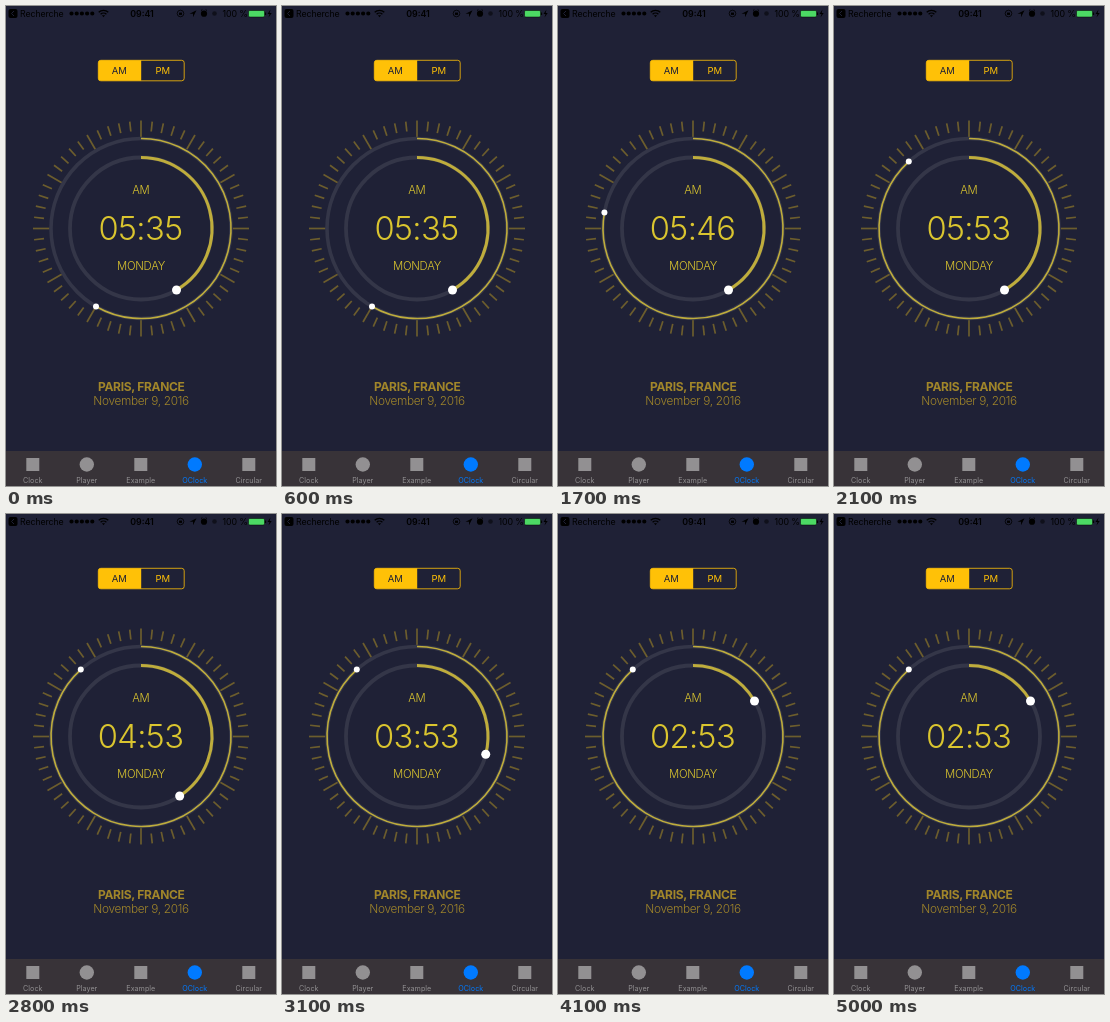
Animation of 270x480 px, one loop 5.1 s. Source, as an HTML page:

```html
<!DOCTYPE html>
<html lang="en">
<head>
<meta charset="utf-8">
<title>Clock slider</title>
<style>
html, body { margin: 0; width: 100%; height: 100%; overflow: hidden; background: #1f2136; }
svg { display: block; width: 100%; height: 100%; font-family: Inter, Roboto, sans-serif; }
.mid { text-anchor: middle; }
.dial { fill: #dac52f; font-size: 11.3px; font-weight: 300; letter-spacing: -.25px; }
.time { fill: #dac52f; font-size: 32.7px; font-weight: 300; letter-spacing: -.6px; }
.place { fill: #a1862a; font-size: 12px; font-weight: 700; letter-spacing: -.3px; }
.date { fill: #a1862a; font-size: 11.8px; font-weight: 300; letter-spacing: -.3px; }
.track { fill: none; stroke: #343648; }
.arc { fill: none; stroke: #bfad3c; }
.tab { font-size: 7.2px; }
</style>
</head>
<body>
<svg viewBox="0 0 270 480">
  <rect width="270" height="480" fill="#1f2136"/>

  <g id="status" font-size="8.8">
    <rect x="2.5" y="3" width="9" height="9" rx="2"/>
    <path d="M8 5 5.5 7.5 8 10" fill="none" stroke="#1f2136"/>
    <text x="14" y="10.5" letter-spacing="-.1">Recherche</text>
    <path d="M65.5 7.5h22" stroke="#000" stroke-width="4.2" stroke-linecap="round" stroke-dasharray="0 5.2"/>
    <g fill="none" stroke="#000" stroke-width="1.3">
      <path d="M92.7 6.3a6.8 6.8 0 0 1 9.6 0M94.6 8.3a4.2 4.2 0 0 1 5.8 0"/>
      <circle cx="174.5" cy="7.5" r="3.3" stroke-width=".8"/>
      <path d="M195 4.6l1.3-1M201 4.6l-1.3-1" stroke-width=".9"/>
    </g>
    <circle cx="198" cy="7.7" r="3.1"/>
    <path d="M95.9 9.3h3.2l-1.6 1.9zM183.5 7.8l7-3.5-3.5 7v-3.5zM264.5 3.5l-3 4.5h2l-1 3.5 3.2-4.6h-2z"/>
    <rect x="173" y="6.6" width="3" height="2.3"/>
    <circle cx="208.5" cy="7.5" r="2.3" opacity=".5"/>
    <text x="136" y="10.5" class="mid" font-weight="600">09:41</text>
    <text x="216.500" y="10.5" letter-spacing="-.1">100 %</text>
    <rect x="242.5" y="4.500" width="16" height="6.5" rx="1.3" fill="#4cd964" stroke="#000" stroke-width=".5"/>
    <path d="M259.6 6.5v2.5" stroke="#000"/>
  </g>

  <g font-size="9.5" class="mid">
    <rect x="92.3" y="54.3" width="85.9" height="20.5" rx="2.5" fill="none" stroke="#ffc107" stroke-width=".8"/>
    <path d="M135.2 54.3H94.800a2.5 2.5 0 0 0-2.5 2.5v15.5a2.5 2.5 0 0 0 2.5 2.5H135.2z" fill="#ffc107"/>
    <text x="113.2" y="68" fill="#1f2136">AM</text>
    <text x="156.8" y="68" fill="#ffc107">PM</text>
  </g>

  <g transform="translate(135 222.5)">
    <g id="ticks" stroke="#6c5d2d" stroke-width="1.7"></g>
    <circle class="track" r="90" stroke-width="3.6"/>
    <circle class="track" r="71" stroke-width="3.8"/>
    <path id="minArc" class="arc" stroke-width="1.6"/>
    <path id="hourArc" class="arc" stroke-width="3"/>
    <circle id="minKnob" r="3" fill="#fff"/>
    <circle id="hourKnob" r="4.5" fill="#fff"/>
  </g>

  <g class="mid">
    <text class="dial" x="134.8" y="188">AM</text>
    <text class="time" id="time" x="134.5" y="234">05:35</text>
    <text class="dial" x="135" y="264.1">MONDAY</text>
    <text class="place" x="135.3" y="385">PARIS, FRANCE</text>
    <text class="date" x="135.1" y="399">November 9, 2016</text>
  </g>

  <rect y="445" width="270" height="35" fill="#383338"/>
  <g id="tabs" class="mid"></g>
</svg>
<script>
const LOOP = 5100, STEP = 100;
const $ = id => document.getElementById(id);

// [ms, value] pairs: a drag, then a snap to the whole unit on release
const minuteKeys = [[900, 35], [1200, 34.1], [1300, 36], [1700, 46.7], [1900, 50.8], [2100, 53]];
const hourKeys = [[2700, 5], [2800, 4.9], [3000, 4.05], [3300, 2.35], [3400, 1.86], [3600, 1.75], [3700, 2]];

function valueAt(keys, t) {
  if (t <= keys[0][0]) return keys[0][1];
  for (let i = 1; i < keys.length; i++) {
    const [t0, a] = keys[i - 1], [t1, b] = keys[i];
    if (t <= t1) return a + (b - a) * (t - t0) / (t1 - t0);
  }
  return keys[keys.length - 1][1];
}

const polar = (r, turn) => {
  const a = turn * 2 * Math.PI;
  return [r * Math.sin(a), -r * Math.cos(a)].map(n => n.toFixed(2));
};

function setSlider(name, r, turn) {
  const [x, y] = polar(r, turn);
  $(name + 'Arc').setAttribute('d', `M0 ${-r}A${r} ${r} 0 ${turn > .5 ? 1 : 0} 1 ${x} ${y}`);
  $(name + 'Knob').setAttribute('cx', x);
  $(name + 'Knob').setAttribute('cy', y);
}

const pad = n => String(Math.floor(n + 1e-6)).padStart(2, '0');

function draw() {
  const t = Math.floor(performance.now() % LOOP / STEP) * STEP;
  const m = valueAt(minuteKeys, t), h = valueAt(hourKeys, t);
  setSlider('min', 90, m / 60);
  setSlider('hour', 71, h / 12);
  $('time').textContent = pad(h) + ':' + pad(m);
  requestAnimationFrame(draw);
}

let ticks = '';
for (let i = 0; i < 60; i++) {
  const inner = i % 5 ? 97.5 : 91.5, outer = i % 5 ? 107.5 : 108;
  ticks += `<path d="M${polar(inner, i / 60)}L${polar(outer, i / 60)}"/>`;
}
$('ticks').innerHTML = ticks;

$('tabs').innerHTML = ['Clock', 'Player', 'Example', 'OClock', 'Circular'].map((label, i) => {
  const x = 26.8 + 54 * i;
  const icon = i % 2
    ? `<circle cx="${x}" cy="458.5" r="7.2"/>`
    : `<rect x="${x - 6.5}" y="452" width="13" height="13"/>`;
  return `<g fill="${i === 3 ? '#007aff' : '#929092'}">${icon}<text class="tab" x="${x}" y="477.4">${label}</text></g>`;
}).join('');

draw();
</script>
</body>
</html>
```
